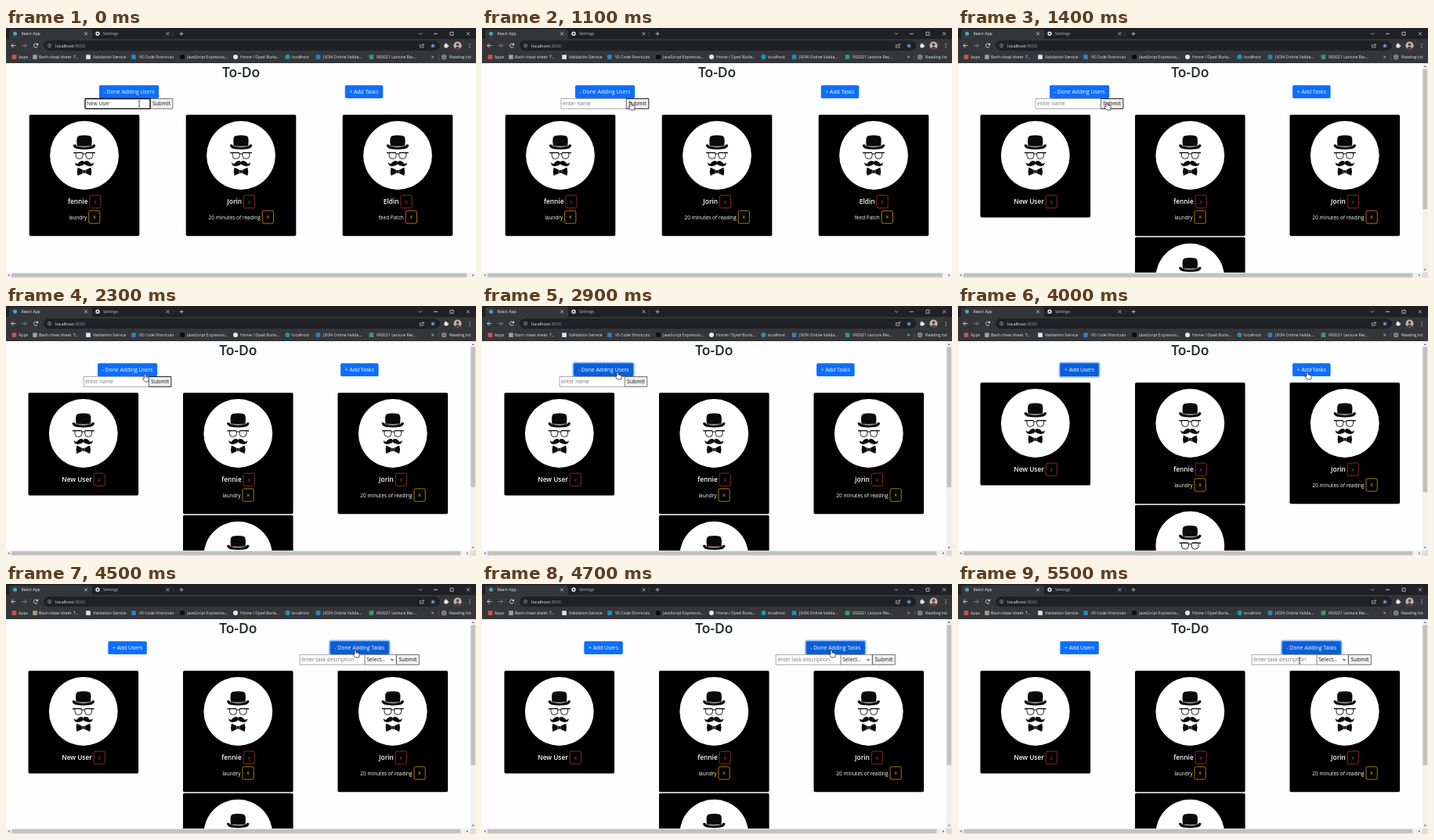
An HTML page with a canvas that plays this animation: 600 px wide and 320 px high, repeating every 5600 ms.

```html
<!DOCTYPE html>
<html lang="en">
<head>
<meta charset="utf-8">
<title>To-Do</title>
<style>
html, body { margin: 0; width: 100%; height: 100%; overflow: hidden; background: #fff; }
canvas { display: block; width: 600px; height: 320px; }
</style>
</head>
<body>
<canvas id="stage"></canvas>
<script>
const canvas = document.getElementById('stage');
const ctx = canvas.getContext('2d');
const dpr = window.devicePixelRatio || 1;
canvas.width = 600 * dpr;
canvas.height = 320 * dpr;

const LOOP = 5600, STEP = 100;
const FONT = '"Open Sans", "Noto Sans", sans-serif';
const BLUE = '#0d6efd', BLUE_DARK = '#0b5ed7';
const TOP = 45, BAR = 7.47; // page top, scrollbar thickness
const clamp = v => Math.max(0, Math.min(1, v));

function setFont(size, weight = 400) {
  ctx.font = `${weight} ${size}px ${FONT}`;
}
function text(s, x, y, size, color, weight = 400, align = 'left') {
  setFont(size, weight);
  ctx.textAlign = align;
  ctx.fillStyle = color;
  ctx.fillText(s, x, y);
}
function rect(x, y, w, h, color) {
  ctx.fillStyle = color;
  ctx.fillRect(x, y, w, h);
}
function box(x, y, w, h, r, fill, stroke, lw = 0.6) {
  ctx.beginPath();
  ctx.roundRect(x, y, w, h, r);
  if (fill) { ctx.fillStyle = fill; ctx.fill(); }
  if (stroke) { ctx.strokeStyle = stroke; ctx.lineWidth = lw; ctx.stroke(); }
}
function disc(x, y, r, fill) {
  ctx.beginPath();
  ctx.arc(x, y, r, 0, Math.PI * 2);
  ctx.fillStyle = fill;
  ctx.fill();
}
function ring(x, y, r, color, lw, from = 0, to = Math.PI * 2) {
  ctx.beginPath();
  ctx.arc(x, y, r, from, to);
  ctx.strokeStyle = color;
  ctx.lineWidth = lw;
  ctx.stroke();
}
function path(d, x, y, fill, stroke, lw = 0.7) {
  const p = new Path2D(d);
  ctx.save();
  ctx.translate(x, y);
  if (fill) { ctx.fillStyle = fill; ctx.fill(p); }
  if (stroke) { ctx.strokeStyle = stroke; ctx.lineWidth = lw; ctx.stroke(p); }
  ctx.restore();
}

// Browser window
const PALE = '#e8eaed', DIM = '#8c9095';
const CROSS = 'M-2-2L2 2M2-2L-2 2';
const bookmarks = [
  [10.5, '#c9564c', 16, 'Apps', 1],
  [37, '#a5a08c', 42, 'Bash cheat sheet: T...', 1],
  [105, '#dce8f4', 111, 'Validation Service', 1],
  [163, '#2489ca', 170, 'VS Code Shortcuts', 1],
  [225, '#0c0c0e', 231, 'JavaScript Expressio...', 0],
  [293, '#e8eaed', 299, 'Home / Dyed Burla...', 0],
  [359.5, '#1a9bae', 365, 'localhost', 0],
  [398.5, '#2a86bd', 405, 'JSON Online Valida...', 1],
  [466.5, '#34a065', 473, '092021 Lecture Rec...', 1]
];

function drawBrowser() {
  rect(0, 0, 600, 14, '#202124');
  box(4, 1.5, 106, 16, 3.5, '#35363a');
  rect(0, 14, 600, TOP - 14, '#35363a');

  disc(11.5, 7.3, 2.5, '#45a6bf');
  text('React App', 19.5, 9.3, 5.2, PALE);
  path(CROSS, 102, 7.3, null, PALE, 0.7);
  ring(117, 7.3, 1.9, '#e0e2e5', 1.6);
  text('Settings', 124, 9.3, 5.2, '#c0c3c7');
  path(CROSS, 206.5, 7.3, null, PALE, 0.7);
  path('M-2.5 0H2.5M0-2.5V2.5', 224, 7.3, null, PALE, 0.7);
  rect(213, 4, 0.5, 7, '#55585c');
  path('M-2-1L0 1L2-1', 529, 7.3, null, PALE, 0.7);
  path('M-2.5 0H2.5', 548.5, 7.3, null, PALE, 0.8);
  box(567, 5.3, 4, 4, 0, null, PALE, 0.7);
  path(CROSS, 590, 7.3, null, PALE, 0.7);

  path('M2.8 0H-2.8M0-2.6L-2.8 0L0 2.6', 9.5, 22.5, null, PALE, 0.8);
  path('M-2.8 0H2.8M0-2.6L2.8 0L0 2.6', 23.5, 22.5, null, DIM, 0.8);
  ring(38, 22.5, 2.5, PALE, 0.8, 0.4, 5.4);
  path('M0-3V0H-2.8Z', 41, 22, PALE);
  box(48, 16, 506, 13, 6.5, '#202124');
  ring(55.5, 22.5, 2.2, '#b5b8bc', 0.6);
  rect(55.2, 21.8, 0.6, 2.2, '#b5b8bc');
  rect(55.2, 20.9, 0.6, 0.6, '#b5b8bc');
  text('localhost', 63, 24.6, 5.65, '#f1f3f4');
  const hostW = ctx.measureText('localhost').width;
  text(':3000', 63 + hostW, 24.6, 5.65, '#9aa0a6');
  path('M-1-1H-2.5V2.5H2V1M-.8 1Q-.8-1.2 2.6-1.2M1.2-2.8L2.8-1.2L1.2.4', 531, 22.5, null, PALE, 0.6);
  path('M0-3.2L.9-1L3.2-.9L1.4.6L2 2.9L0 1.6L-2 2.9L-1.4.6L-3.2-.9L-.9-1Z', 545, 22.7, '#5b9cf5');
  box(559.5, 20.8, 4.4, 4.4, 0.8, PALE);
  disc(561.6, 20.5, 1.1, PALE);
  disc(564.2, 23, 1.1, PALE);

  // profile silhouette
  disc(576.5, 22.5, 5, '#c9b8ae');
  disc(576.5, 21.2, 1.9, '#59423c');
  path('M-3.2 4C-3 .3 3 .3 3.2 4Q0 6 -3.2 4Z', 576.5, 22.5, '#59423c');
  for (const dy of [-2.2, 0, 2.2]) disc(592, 22.5 + dy, 0.6, PALE);

  for (const [ix, color, tx, label, square] of bookmarks) {
    if (square) rect(ix - 2.8, 34.3, 5.6, 5.6, color);
    else disc(ix, 37.1, 3, color);
    text(label, tx, 39, 5.2, PALE);
  }
  text('»', 543, 39, 6.5, PALE);
  rect(552, 33, 0.5, 8, '#5f6368');
  box(556.8, 34.8, 4.6, 4.6, 0.5, null, PALE, 0.7);
  rect(557.8, 36.2, 2.6, 0.6, PALE);
  rect(557.8, 37.6, 2.6, 0.6, PALE);
  text('Reading list', 566, 39, 5.2, PALE);
}

// Cards
const INK = '#0a0a0a';
const HAT = 'M-9.3-11.5C-9.3-16-11.5-25.3-5.5-25.3Q0-26 5.5-25.3C11.5-25.3 9.3-16 9.3-11.5Z';
const BRIM = 'M-14.3-13.2Q-11.5-15.4-9.6-11.8Q0-9 9.6-11.8Q11.5-15.4 14.3-13.2Q13.8-9 8.5-8.2Q0-6.6-8.5-8.2Q-13.8-9-14.3-13.2Z';
const STACHE = 'M0 8.4C-3 5.4-6 7.8-8 10.3Q-10 11.8-12 9.1Q-12 14-7 14Q-3 14 0 11.2Z';
const BOW = 'M0 19.1L-1.8 18.7L-8.4 15.5Q-10 20.4-8.4 26L-1.8 23L0 22.6Z';

function drawAvatar(x, y) {
  disc(x, y, 43.9, '#fff');
  path(HAT, x, y, INK);
  path(BRIM, x, y, INK);
  path('M-9.4-12.6Q0-9.8 9.4-12.6', x, y, null, '#999', 0.4);
  ctx.save();
  ctx.translate(x, y);
  for (const side of [1, -1]) {
    ctx.scale(side, 1);
    box(-10.8, -3.6, 8.9, 8, [1.6, 1.6, 4, 4], null, INK, 0.9);
    path('M-13.8-4H-2V-2.7H-10.5L-13.8-2.4Z', 0, 0, INK);
    path(STACHE, 0, 0, INK);
    path(BOW, 0, 0, INK);
  }
  ctx.restore();
  path('M-2-1.6Q0-3 2-1.6', x, y, null, INK, 1);
  path('M-1.8 18.5V23.1M1.8 18.5V23.1', x, y, null, '#fff', 0.4);
}

function cardLine(label, cx, y, size, weight, color) {
  setFont(size, weight);
  const w = ctx.measureText(label).width;
  const left = cx - (w + 16.6) / 2;
  text(label, left, y, size, '#fff', weight);
  const bx = left + w + 2.4;
  box(bx, y - 10.6, 14.2, 16.2, 1.8, null, color, 0.7);
  text('x', bx + 7.1, y - 0.1, 6.8, color, 500, 'center');
}

function drawCard(cx, y, name, task) {
  box(cx - 70.3, y, 140.6, task ? 155.3 : 131.5, 1.8, '#000');
  drawAvatar(cx, y + 52);
  cardLine(name, cx, y + 113.7, 8.3, 600, '#c93545');
  if (task) cardLine(task, cx, y + 133.5, 6.5, 500, '#f0b40c');
}

// Controls
function button(label, cx, dark, glow) {
  setFont(6.8, 500);
  const w = ctx.measureText(label).width + 11.4;
  const x = cx - w / 2;
  if (glow > 0) box(x - 1.7, 71.6, w + 3.4, 20.1, 3, `rgba(49,132,253,${0.5 * glow})`);
  box(x, 73.3, w, 16.7, 1.8, dark ? BLUE_DARK : BLUE);
  text(label, cx, 84.2, 6.8, '#fff', 500, 'center');
}
function field(x, value, hint, focused) {
  box(x, 90.5, 83, 12.8, focused ? 1 : 0, '#fff', focused ? '#000' : '#858585', focused ? 1.3 : 0.7);
  text(value || hint, x + 2, 99.3, 6.6, value ? '#212529' : '#757575');
}
function submit(x, focused) {
  box(x, 90.5, 28.8, 12.8, 0, '#efefef', focused ? '#222' : '#555', focused ? 1 : 0.8);
  text('Submit', x + 14.4, 99.3, 6.9, '#111', 400, 'center');
}
function select(x) {
  box(x, 90.5, 40, 12.8, 0, '#fff', '#767676', 0.8);
  text('Select...', x + 2, 99.3, 6.8, '#111');
  path('M-2-1L0 1L2-1', x + 35, 97, null, '#111', 1);
}

function scrollbars(W, contentH) {
  const ARROW = '#606060', THUMB = '#c1c1c1';
  rect(0, 313, 600, 7, '#f1f1f1');
  rect(7, 313.8, (W - 14) * W / (W + 5.3), 5.4, THUMB);
  path('M1-1.6L-1 0L1 1.6Z', 3.5, 316.5, ARROW);
  path('M-1-1.6L1 0L-1 1.6Z', W - 3.5, 316.5, ARROW);
  if (W === 600) return;
  rect(W, TOP, BAR, 313 - TOP, '#f1f1f1');
  rect(W + 0.9, TOP + 7.5, 5.7, 253 * 268 / contentH, THUMB);
  path('M-1.6 1L0-1L1.6 1Z', 596.3, 49, ARROW);
  path('M-1.6-1L0 1L1.6-1Z', 596.3, 309.5, ARROW);
  rect(W, 313, BAR, 7, '#dcdcdc');
}

// Pointer: time, x, y
const moves = [
  [0, 170, 97], [500, 190, 95], [2100, 190, 95], [2400, 173, 84],
  [3300, 173, 84], [3900, 446, 84], [5200, 446, 84], [5500, 436, 98]
];
function pointerAt(t) {
  for (let i = 1; i < moves.length; i++) {
    const [t0, x0, y0] = moves[i - 1], [t1, x1, y1] = moves[i];
    if (t > t1) continue;
    const k = clamp((t - t0) / (t1 - t0)), e = k * k * (3 - 2 * k);
    return [x0 + (x1 - x0) * e, y0 + (y1 - y0) * e];
  }
  return moves[moves.length - 1].slice(1);
}
const HAND = 'M-1 .8Q0-.4 1 .8V3.8L4.4 4.7Q5.4 5.1 5.2 6.5L4.5 10H-.2L-3.2 6.4Q-3.2 5-1 6.2Z';
const ARROW_SHAPE = 'M0 0V8.2L1.9 6.5L3.2 9.3L4.4 8.8L3.2 6H5.8Z';
const IBEAM = 'M-1.6-3.8H-.5L0-3.4L.5-3.8H1.6M0-3.4V3.4M-1.6 3.8H-.5L0 3.4L.5 3.8H1.6';

function drawPointer(t, usersOpen, tasksOpen) {
  const [x, y] = pointerAt(t);
  const inRow = y > 90 && y < 104;
  const overField = inRow && (usersOpen ? x > 100 && x < 183 : tasksOpen && x > 375 && x < 458);
  const overSubmit = usersOpen && inRow && x >= 183 && x < 213;
  const overButton = y > 73 && y <= 90 && (usersOpen ? x > 117 && x < 194 : x > 130 && x < 180 || x > 427 && x < 476);
  if (overField) path(IBEAM, x, y, null, '#111', 0.7);
  else if (overSubmit || overButton) path(HAND, x, y, '#fff', '#111', 0.7);
  else path(ARROW_SHAPE, x, y, '#fff', '#111', 0.6);
}

function draw(t) {
  const added = t >= 1400;
  const usersOpen = t < 3000, tasksOpen = t >= 4500;
  const W = added ? 600 - BAR : 600;
  const left = W * 0.2617, right = W * 0.7617;
  const top = usersOpen || tasksOpen ? 111 : 98;
  const col = i => W * (i + 0.5) / 3;

  ctx.setTransform(dpr, 0, 0, dpr, 0, 0);
  rect(0, 0, 600, 320, '#fefdff');
  text('To-Do', W / 2, 63, 17.4, '#212529', 600, 'center');

  const usersFocus = t < 4400 ? clamp((t - 2700) / 200) : 0;
  button(usersOpen ? '- Done Adding Users' : '+ Add Users', left, t >= 2400 && t < 4400, usersFocus);
  button(tasksOpen ? '- Done Adding Tasks' : '+ Add Tasks', right, t >= 4100, clamp((t - 4300) / 200));

  if (usersOpen) {
    submit(left + 27, t >= 1000 && t < 2800);
    field(left - 56, t < 1100 ? 'New User' : '', 'enter name', t < 1000);
  }
  if (tasksOpen) {
    field(right - 76.2, '', 'enter task description', false);
    select(right + 6.8);
    submit(right + 47.2, false);
  }

  const people = [
    ['fennie', 'laundry'],
    ['Jorin', '20 minutes of reading'],
    ['Eldin', 'feed Patch']
  ];
  if (added) people.unshift(['New User', '']);
  people.forEach(([name, task], i) => {
    const wrapped = i === 3;
    drawCard(col(wrapped ? 1 : i), top + (wrapped ? 156.7 : 0), name, task);
  });

  scrollbars(W, top + 312 - TOP);
  drawBrowser();
  drawPointer(t, usersOpen, tasksOpen);
}

const start = performance.now();
function tick() {
  const t = (performance.now() - start) % LOOP;
  draw(Math.floor(t / STEP) * STEP);
  requestAnimationFrame(tick);
}
tick();
</script>
</body>
</html>
```
